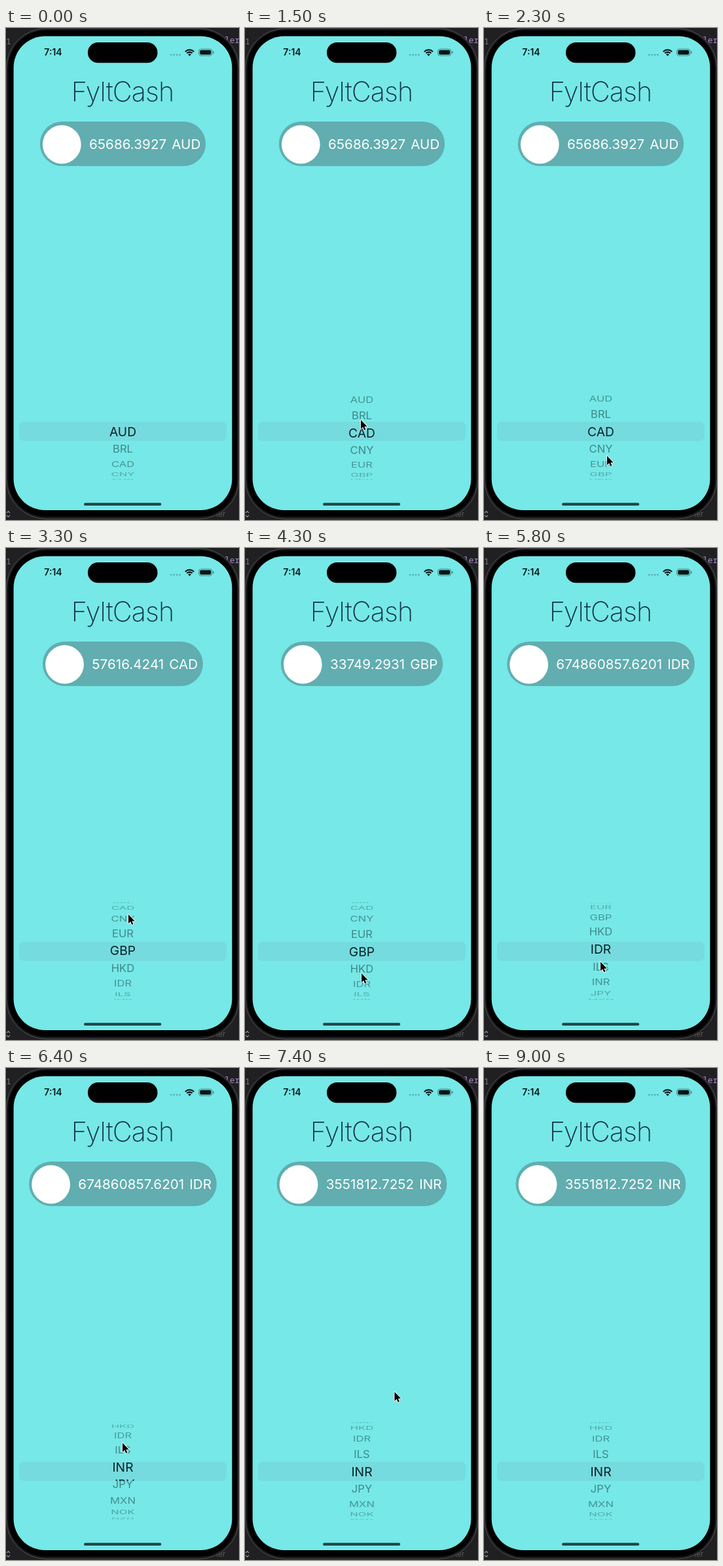
An HTML page with a canvas that plays this animation: 356 by 752 pixels, repeating every 9.3 s.

```html
<!DOCTYPE html>
<html lang="en">
<head>
<meta charset="utf-8">
<title>Currency picker</title>
<style>
  html, body { margin: 0; width: 356px; height: 752px; overflow: hidden; background: #202022; }
  canvas { display: block; width: 356px; height: 752px; }
</style>
</head>
<body>
<canvas id="stage"></canvas>
<script>
const W = 356, H = 752, LOOP = 9300, STEP = 100;
const canvas = document.getElementById('stage');
const dpr = window.devicePixelRatio || 1;
canvas.width = W * dpr;
canvas.height = H * dpr;
const ctx = canvas.getContext('2d');

const CODES = 'AUD BRL CAD CNY EUR GBP HKD IDR ILS INR JPY MXN NOK NZD PLN'.split(' ');
const CX = 178.5;
const INK = '#071616';
const WHEEL = { y: 616.5, radius: 74.3, step: 20.9 * Math.PI / 180 };
const BAND = [20, 602, 317, 29];

// Each drag lets go of the wheel at row `drop`; it settles on the nearest row
// and the amount for that row arrives at `loaded`.
const DRAGS = [
  { press: 900, release: 1500, from: [177, 654], to: [177, 599], drop: 1.92, loaded: 2600, amount: '57616.4241' },
  { press: 2500, release: 3300, from: [188, 654], to: [187, 560], drop: 5.04, loaded: 3700, amount: '33749.2931' },
  { press: 4300, release: 4900, from: [178, 650], to: [178, 560], drop: 7.04, loaded: 5300, amount: '674860857.6201' },
  { press: 5700, release: 6400, from: [178, 636], to: [178, 573], drop: 9.25, loaded: 7100, amount: '3551812.7252' }
];
const FIRST_AMOUNT = '65686.3927';
const ENTER = { time: 250, point: [344, 420] };
const LEAVE = { time: 7300, point: [279, 417] };

const mix = (a, b, p) => a + (b - a) * p;
const mixPoint = (a, b, p) => a.map((v, i) => mix(v, b[i], p));

function ease(t, from, to) {
  const p = Math.min(1, Math.max(0, (t - from) / (to - from)));
  return p * p * (3 - 2 * p);
}

function rowAt(t) {
  return DRAGS.reduce((row, d) => {
    const dragged = mix(row, d.drop, ease(t, d.press, d.release));
    return mix(dragged, Math.round(d.drop), ease(t, d.release, d.release + 350));
  }, 0);
}

function pointerAt(t) {
  const point = DRAGS.reduce((p, d) => {
    const ready = mixPoint(p, d.from, ease(t, d.press - 650, d.press - 200));
    return mixPoint(ready, d.to, ease(t, d.press, d.release));
  }, ENTER.point);
  return mixPoint(point, LEAVE.point, ease(t, LEAVE.time, LEAVE.time + 200));
}

function box(x, y, w, h, r, fill, stroke) {
  ctx.beginPath();
  ctx.roundRect(x, y, w, h, r);
  if (fill) { ctx.fillStyle = fill; ctx.fill(); }
  if (stroke) { ctx.strokeStyle = stroke; ctx.lineWidth = 1; ctx.stroke(); }
}

function disc(x, y, r, fill) {
  ctx.beginPath();
  ctx.arc(x, y, r, 0, 7);
  ctx.fillStyle = fill;
  ctx.fill();
}

function text(str, x, y, size, fill, { weight = 400, align = 'left', gap = 0, family = 'Inter, sans-serif' } = {}) {
  ctx.font = `${weight} ${size}px ${family}`;
  ctx.letterSpacing = gap + 'px';
  ctx.textAlign = align;
  ctx.fillStyle = fill;
  ctx.fillText(str, x, y);
  return ctx.measureText(str).width;
}

function drawDesktop() {
  ctx.fillStyle = '#202022';
  ctx.fillRect(0, 0, W, H);
  const mono = { family: '"Noto Sans Mono", monospace' };
  text('1', 0, 25, 13, '#77777c', mono);
  text('ler', 334, 23, 13, '#a98bd0', mono);
  text('ter', 321, 747, 11, '#5c5c60');
  ctx.strokeStyle = '#a0a0a4';
  ctx.lineWidth = 1.1;
  for (const s of [-1, 1]) {
    ctx.beginPath();
    ctx.moveTo(1, 743 + s * 1.8);
    ctx.lineTo(3.5, 743 + s * 4.2);
    ctx.lineTo(6, 743 + s * 1.8);
    ctx.stroke();
  }
}

function drawPhone() {
  box(0.5, 0.5, 355.5, 750, 61, '#1b1b1d', '#505054');
  box(3.5, 3.5, 349.5, 743.5, 57, '#000');
  box(11.6, 12.5, 333.8, 724.5, 48, '#75e8e7');
  box(125, 22, 106.5, 31.3, 15.6, '#000');
  box(119, 725.8, 118.3, 4.2, 2.1, '#20494b');
}

function drawStatus() {
  text('7:14', 72, 42.3, 14, INK, { weight: 600, align: 'center' });
  for (let i = 0; i < 4; i++) disc(252.3 + i * 4.4, 41, 1.3, '#55a9a9');

  ctx.strokeStyle = ctx.fillStyle = INK;
  const x = 280.5, y = 42.8, from = -Math.PI * 0.75, to = -Math.PI * 0.25;
  ctx.lineWidth = 2.1;
  for (const r of [9.4, 5.9]) {
    ctx.beginPath();
    ctx.arc(x, y, r, from, to);
    ctx.stroke();
  }
  ctx.beginPath();
  ctx.moveTo(x, y);
  ctx.arc(x, y, 3.4, from, to);
  ctx.fill();

  box(294.6, 32.2, 20.4, 10.2, 3.4, null, 'rgba(0,30,30,.45)');
  box(296.2, 33.8, 17.2, 7, 2, INK);
  box(316.2, 35.5, 1.3, 3.6, 0.7, 'rgba(0,30,30,.5)');
}

// The pill hugs its badge, amount and code, and stays centred.
function drawRate(t) {
  const last = DRAGS.filter(d => d.loaded <= t).pop();
  const amount = last ? last.amount : FIRST_AMOUNT;
  const code = CODES[last ? Math.round(last.drop) : 0];
  const size = 20.7, base = 185.2, lead = 75.2, space = 8, tail = 7.8;
  ctx.font = `400 ${size}px Inter, sans-serif`;
  ctx.letterSpacing = '0px';
  const width = lead + ctx.measureText(amount).width + space + ctx.measureText(code).width + tail;
  const left = CX - width / 2;
  box(left, 143, width, 68, 34, '#61adb0');
  disc(left + 33.5, 178, 29.4, '#fff');
  const end = left + lead + text(amount, left + lead, base, size, '#fff');
  text(code, end + space, base, size, '#fff');
}

function drawRows(row, active) {
  ctx.save();
  ctx.beginPath();
  ctx.rect(...BAND);
  if (!active) ctx.rect(0, 0, W, H);
  ctx.clip('evenodd');
  const size = active ? 19.3 : 16.6;
  CODES.forEach((code, i) => {
    const angle = (i - row) * WHEEL.step;
    if (Math.abs(angle) >= Math.PI / 2) return;
    const depth = Math.cos(angle);
    const alpha = 0.16 + 0.36 * depth;
    ctx.save();
    ctx.translate(CX, WHEEL.y + WHEEL.radius * Math.sin(angle));
    ctx.scale(1, depth);
    text(code, 0, size * 0.3635, size, active ? '#0b2224' : `rgba(8,36,38,${alpha})`, { align: 'center' });
    ctx.restore();
  });
  ctx.restore();
}

function drawPicker(t) {
  const row = rowAt(t);
  box(...BAND, 7, '#75dbde');
  drawRows(row, false);
  drawRows(row, true);
}

function drawPointer(t) {
  if (t < ENTER.time || t >= LEAVE.time + 300) return;
  ctx.save();
  ctx.translate(...pointerAt(t));
  ctx.scale(0.86, 0.86);
  const arrow = new Path2D('M0 0V16.2L3.7 12.8L6.1 18.4L8.7 17.3L6.3 11.8H11.4Z');
  ctx.lineJoin = 'round';
  ctx.lineWidth = 2;
  ctx.strokeStyle = '#fff';
  ctx.stroke(arrow);
  ctx.fillStyle = '#000';
  ctx.fill(arrow);
  ctx.restore();
}

function draw(t) {
  ctx.setTransform(dpr, 0, 0, dpr, 0, 0);
  drawDesktop();
  drawPhone();
  drawStatus();
  text('FyltCash', 178, 112.3, 41.4, '#15344a', { weight: 200, align: 'center', gap: -1 });
  drawRate(t);
  drawPicker(t);
  drawPointer(t);
}

const start = performance.now();
function tick() {
  const t = (performance.now() - start) % LOOP;
  draw(Math.floor(t / STEP) * STEP);
  requestAnimationFrame(tick);
}
tick();
</script>
</body>
</html>
```
